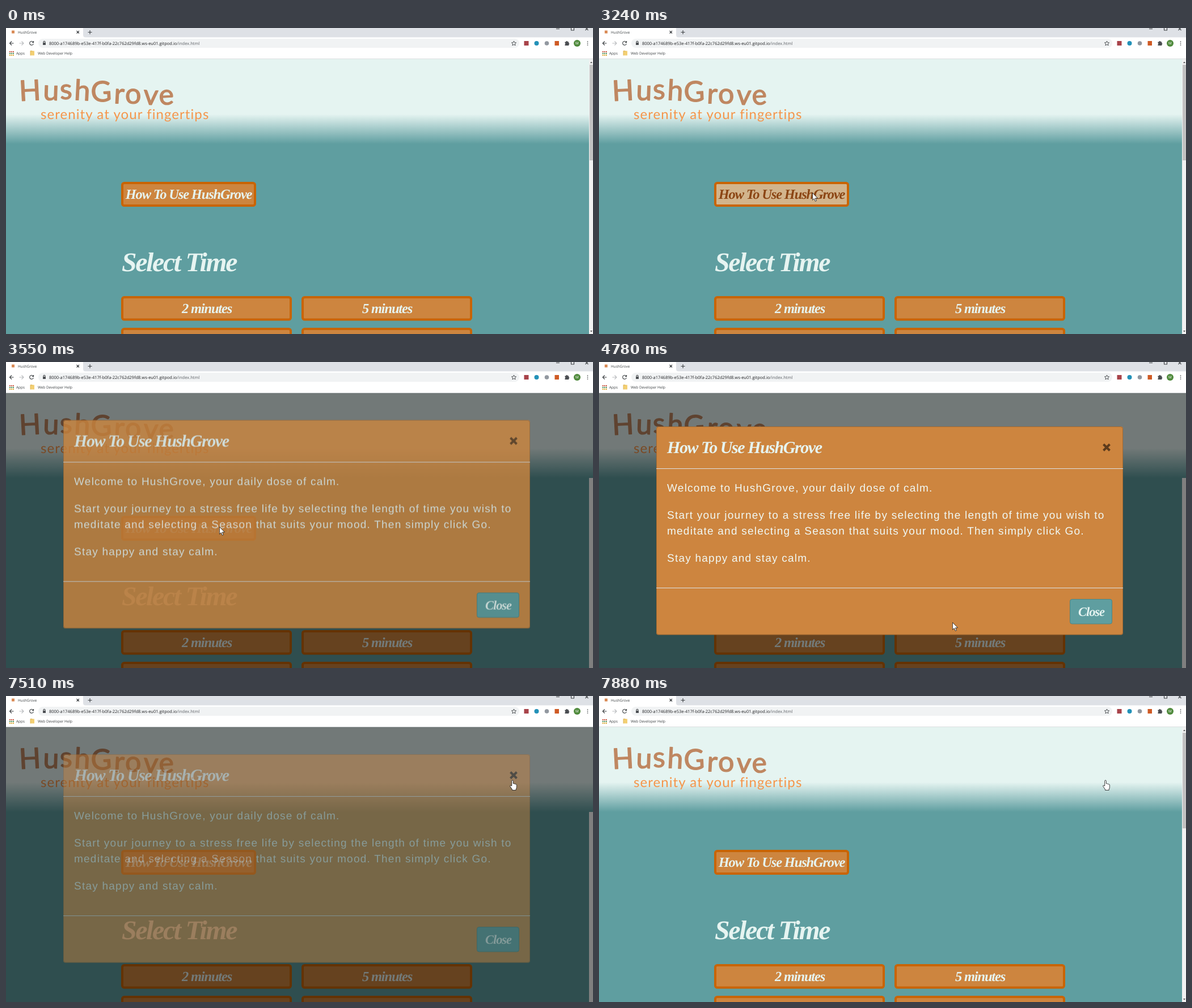
Recreate the animation shown at these times as an HTML page. Size 1035 by 541 pixels, loop 8000 ms.

```html
<!DOCTYPE html>
<html lang="en">
<head>
<meta charset="utf-8">
<title>HushGrove</title>
<style>
  html, body { margin: 0; width: 100%; height: 100%; overflow: hidden; background: #fff; }
  svg { display: block; width: 1035px; height: 541px; }
  text { white-space: pre; text-rendering: geometricPrecision; }

  .ui { font-family: "Open Sans", sans-serif; font-size: 6.4px; fill: #3c4043; }
  .url { font-size: 7.5px; fill: #202124; }
  .script { font-family: "Liberation Serif", serif; font-weight: 700; font-style: italic; letter-spacing: -.048em; fill: #e6f4f1; }
  .mid { text-anchor: middle; }
  .brand { font: 50px Lato, sans-serif; letter-spacing: 2.7px; fill: #bf8761; stroke: #bf8761; stroke-width: 1.4; stroke-linejoin: round; }
  .tagline { font: 24px Lato, sans-serif; letter-spacing: 1.07px; fill: #f5954a; }
  .body { font-family: "Liberation Sans", sans-serif; font-size: 19px; letter-spacing: 1.24px; fill: #f0f8f4; }
  .btn { fill: #cd853f; stroke: #c96404; stroke-width: 4; }
  .icon { fill: none; stroke: #3c4043; stroke-width: 1.1; }

  .how, .how-text, #bar, #shade, #dialog, #fade, #x, #cursor, #arrow, #hand { animation: 8s linear infinite; }
  .how { animation-name: hover-fill; }
  .how-text { animation-name: hover-text; }
  #bar { animation-name: bar; animation-timing-function: step-end; }
  #shade { animation-name: shade; }
  #dialog { animation-name: slide; }
  #fade { animation-name: fade; }
  #x { animation-name: x-hover; }
  #cursor { animation-name: move; }
  #arrow { animation-name: arrow; animation-timing-function: step-end; }
  #hand { animation-name: hand; animation-timing-function: step-end; }

  @keyframes hover-fill {
    0%, 22.5% { fill: #cd853f; animation-timing-function: ease; }
    28.625%, 41.125% { fill: #d2b48c; animation-timing-function: ease; }
    46.125%, 100% { fill: #cd853f; }
  }
  @keyframes hover-text {
    0%, 22.5% { fill: #e6f4f1; animation-timing-function: ease; }
    28.625%, 41.125% { fill: #8b4513; animation-timing-function: ease; }
    46.125%, 100% { fill: #e6f4f1; }
  }
  @keyframes bar {
    0%, 98.375%, 100% { visibility: visible; }
    41% { visibility: hidden; }
  }
  @keyframes shade {
    0%, 41.125% { opacity: 0; }
    43%, 96.625% { opacity: .5; }
    98.375%, 100% { opacity: 0; }
  }
  @keyframes slide {
    0%, 42.875% { transform: translateY(-27px); animation-timing-function: ease-out; }
    46.625%, 92.875% { transform: none; animation-timing-function: ease-out; }
    96.625%, 100% { transform: translateY(-27px); }
  }
  @keyframes fade {
    0%, 42.875% { opacity: 0; }
    44.75%, 92.875% { opacity: 1; }
    94.75%, 100% { opacity: 0; }
  }
  @keyframes x-hover {
    0%, 79.75% { opacity: .55; }
    79.76%, 100% { opacity: .8; }
  }
  @keyframes move {
    0%, 4.2% { transform: translate(988px, 516px); animation-timing-function: ease-out; }
    12%, 13.3% { transform: translate(768px, 304px); animation-timing-function: ease-in; }
    18.1% { transform: translate(610px, 313px); }
    22.2% { transform: translate(441px, 306px); animation-timing-function: ease-out; }
    23.625%, 50.2% { transform: translate(376px, 291px); animation-timing-function: ease-in-out; }
    57.875% { transform: translate(623px, 461px); }
    59.75%, 71.2% { transform: translate(623px, 460px); animation-timing-function: ease-in-out; }
    79.75% { transform: translate(868px, 158px); }
    80.25% { transform: translate(874px, 155px); }
    81.125% { transform: translate(880px, 153px); animation-timing-function: ease-out; }
    85.125%, 100% { transform: translate(893px, 149px); }
  }
  @keyframes arrow {
    0%, 79.75%, 100% { visibility: hidden; }
    4.25% { visibility: visible; }
  }
  @keyframes hand {
    0% { visibility: hidden; }
    79.75%, 100% { visibility: visible; }
  }
</style>
</head>
<body>
<svg viewBox="0 0 1035 541">
  <defs>
    <linearGradient id="sky" x1="0" y1="0" x2="0" y2="1">
      <stop offset=".65" stop-color="#e5f4f1"/>
      <stop offset="1" stop-color="#5f9ea0"/>
    </linearGradient>
  </defs>

  <!-- Page -->
  <rect width="1035" height="541" fill="#fff"/>
  <rect y="204" width="1028" height="337" fill="#5f9ea0"/>
  <rect y="55" width="1035" height="150" fill="url(#sky)"/>
  <text class="brand" x="24" y="129 127 126 127 131 133 134 135 136" rotate="-3 2 -2 3 -3 3 -2 3 -3">HushGrove</text>
  <text class="tagline" x="61" y="161">serenity at your fingertips</text>

  <rect class="btn how" x="205" y="274" width="234" height="40" rx="3.5"/>
  <text class="script how-text mid" x="322" y="302" font-size="24.5">How To Use HushGrove</text>
  <text class="script" x="204" y="430" font-size="47.7">Select Time</text>
  <rect class="btn" x="205" y="476" width="297" height="39.5" rx="3.5"/>
  <rect class="btn" x="523" y="476" width="297" height="39.5" rx="3.5"/>
  <rect class="btn" x="205" y="532" width="297" height="40" rx="3.5"/>
  <rect class="btn" x="523" y="532" width="297" height="40" rx="3.5"/>
  <text class="script mid" x="354" y="504" font-size="24.5">2 minutes</text>
  <text class="script mid" x="672" y="504" font-size="24.5">5 minutes</text>

  <g id="bar">
    <rect x="1028" y="55" width="7" height="486" fill="#f1f1f1"/>
    <rect x="1029" y="65" width="6" height="169" fill="#c1c1c1"/>
    <path d="M1030 62l2-2.500 2 2.500zM1030 535l2 2.500 2-2.500z" fill="#505050"/>
  </g>

  <rect id="shade" y="55" width="1035" height="486" fill="#000"/>

  <!-- Dialog -->
  <g id="dialog"><g id="fade">
    <rect x="101" y="114" width="823" height="368.500" rx="4" fill="#cd853f"/>
    <rect x="101.500" y="114.500" width="822" height="367.500" rx="4" fill="none" stroke="#000" stroke-opacity=".2"/>
    <path d="M101 188.500H924M101 399.500H924" stroke="#dee2e6"/>
    <text class="script" x="120" y="161" font-size="30">How To Use HushGrove</text>
    <path id="x" d="M889.500 145.500L900.500 156.500M900.500 145.500L889.500 156.500" stroke="#000" stroke-width="4"/>
    <text class="body" x="120" y="229">Welcome to HushGrove, your daily dose of calm.</text>
    <text class="body" x="120" y="276.500">Start your journey to a stress free life by selecting the length of time you wish to</text>
    <text class="body" x="120" y="305">meditate and selecting a Season that suits your mood. Then simply click Go.</text>
    <text class="body" x="120" y="353">Stay happy and stay calm.</text>
    <rect x="830.500" y="419.500" width="74" height="43.500" rx="3.5" fill="#5f9ea0" stroke="#4f8582"/>
    <text class="script mid" x="868" y="449" font-size="22.5">Close</text>
  </g></g>

  <!-- Browser frame -->
  <rect width="1035" height="55" fill="#fff"/>
  <path d="M136 0H1035V16.500H140Q136 16.500 136 12z" fill="#dee1e6"/>
  <rect y="54" width="1035" height="1" fill="#dcdfe1"/>
  <rect x="10" y="4.500" width="5" height="5" fill="#d98a55"/>
  <text class="ui" x="21" y="9.800">HushGrove</text>
  <path class="icon" d="M124.500 5l4.500 4.500M129 5l-4.500 4.500M144.500 7.500h7M148 4v7"/>
  <path class="icon" stroke-width=".8" d="M970 1.500h6M996.500-1v5h5v-5M1021.500-1l5 5M1026.500-1l-5 5"/>

  <rect x="57" y="19" width="848" height="16" rx="8" fill="#f1f3f4"/>
  <path class="icon" d="M13.500 27H6.500M10 23.500L6.500 27l3.500 3.500"/>
  <path class="icon" style="stroke:#b8babd" d="M23.500 27h7.500M27.500 23.500L31 27l-3.500 3.500"/>
  <path class="icon" d="M48 25a3.400 3.400 0 1 0 .4 2.800M48.600 23v2.700h-2.700"/>
  <rect x="65" y="26" width="5" height="4" rx=".5" fill="#4a4d51"/>
  <path class="icon" d="M66 26v-1.200a1.500 1.500 0 0 1 3 0V26" stroke-width=".8"/>
  <text class="ui url" x="76" y="29.700">8000-a174689b-e53e-417f-b0fa-22c762d29fd8.ws-eu01.gitpod.io<tspan fill="#5f6368">/index.html</tspan></text>
  <path class="icon" style="stroke-width:.9" d="M895.500 23l1.200 2.700 2.900.3-2.200 1.900.7 2.900-2.600-1.500-2.600 1.500.7-2.900-2.200-1.900 2.900-.3z"/>
  <rect x="913.500" y="23" width="8" height="8" fill="#a8434a"/>
  <circle cx="935.500" cy="27" r="4" fill="#2391b8"/>
  <circle cx="953.500" cy="27" r="3.800" fill="#9298a0"/>
  <rect x="967.500" y="23" width="7.500" height="8" fill="#cf5b25"/>
  <path d="M985.500 24.500h2a1.400 1.400 0 0 1 2.800 0h2v2.200a1.400 1.400 0 0 1 0 2.700V31h-6.800v-2a1.400 1.400 0 0 0 0-2.500z" fill="#4a4d51"/>
  <circle cx="1007" cy="27" r="6" fill="#4f8a3c"/>
  <text class="ui mid" x="1007" y="29.300" style="fill:#fff">M</text>
  <path d="M1025.500 24v7" stroke="#3c4043" stroke-width="1.700" stroke-linecap="round" stroke-dasharray="0 3" />

  <g stroke-width="2" stroke-dasharray="2 1">
    <path d="M6 42h8" stroke="#c9533f"/>
    <path d="M6 45h8" stroke="#4c8c55"/>
    <path d="M6 48h8" stroke="#d9a62e"/>
  </g>
  <text class="ui" x="18" y="46.800">Apps</text>
  <path d="M43 40.500h7v8h-7z" fill="#f3cf73"/>
  <path d="M43 48.500v-8h3l1 1.500" fill="none" stroke="#d9ae4b" stroke-width=".8"/>
  <text class="ui" x="56" y="46.800">Web Developer Help</text>

  <!-- Pointer -->
  <g id="cursor" stroke="#111" stroke-width=".8" fill="#fff" stroke-linejoin="round">
    <path id="arrow" d="M.4.500V13.300L3.300 10.600L5.300 15.400L7.400 14.500L5.400 9.900H9.600z"/>
    <path id="hand" d="M-1.300 10V1.300a1.300 1.300 0 0 1 2.600 0V6q1.500-.8 2.300.5q1.500-.6 2.100.6q1.600-.3 1.700 1.200V11.500q0 2.500-1.300 4.500V17.500H-.5V16L-4.200 10.800q-.5-1.800 1-1.700z"/>
  </g>
</svg>
</body>
</html>
```
